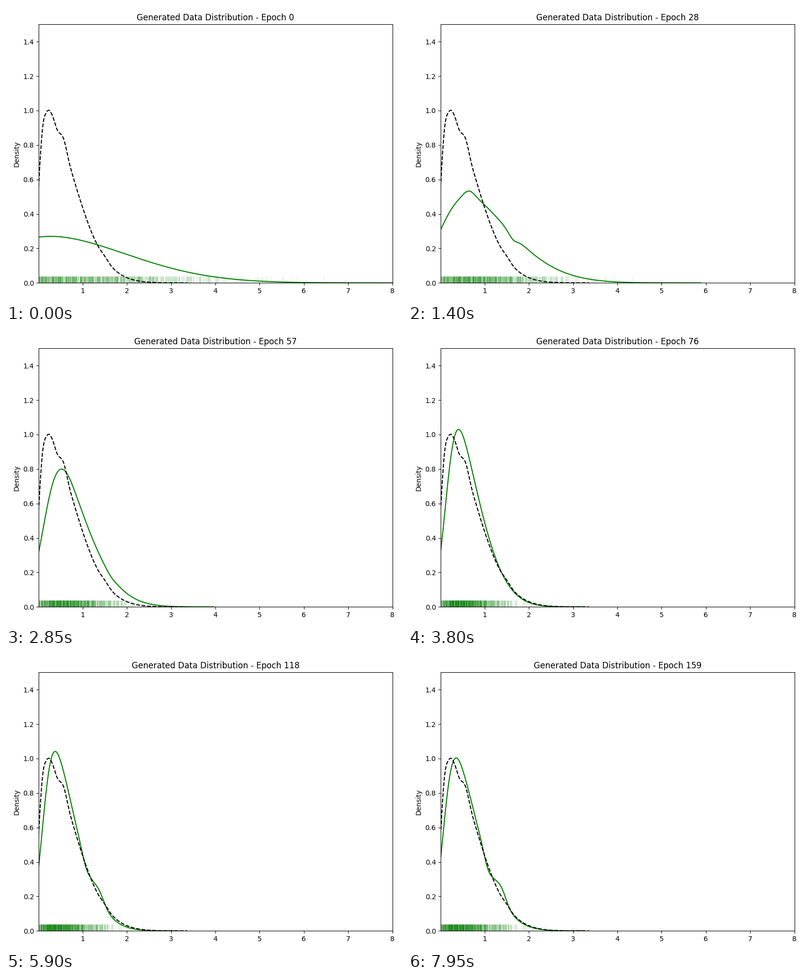
Write a matplotlib script that moves like this. It is 800 px wide and 600 px high and loops after 8 s.

```python
import math

import numpy as np
import matplotlib.pyplot as plt
from matplotlib.animation import FuncAnimation
from matplotlib.collections import LineCollection

FRAMES, INTERVAL = 160, 50
SAMPLES = 1000

# Generated shape over the epochs: bell width, soft left edge and its blur.
EPOCHS = [0, 17, 39, 76, 98, 138, 159]
WIDTH = [2.757, 2.214, 1.466, 1.007, .965, 1.015, 1.02]
EDGE = [-1.3, -.15, .16, .138, .127, .09, .075]
BLUR = [.8, .53, .36, .19, .185, .178, .178]

# Ripples on the smooth shapes: height, centre, width.
REAL_RIPPLES = [(-.022, .17, .06), (-.02, .42, .07),
                (.04, .58, .09), (.012, 1.5, .12)]
EARLY_RIPPLES = [(.05, .65, .17), (-.045, 1.64, .14)]
LATE_RIPPLES = [(-.04, 1.07, .12), (.06, 1.38, .16)]

grid = np.linspace(-5, 10, 1501)
visible = grid >= 0
erf = np.vectorize(math.erf)
quantiles = np.random.default_rng(7).random(SAMPLES)


def half_bell(width, edge, blur):
    """Bell whose left side fades out at a soft edge, with unit area."""
    rise = 1 + erf((grid - edge) / (blur * math.sqrt(2)))
    y = np.exp(-(grid / width) ** 2) * rise
    return y / (y.sum() * (grid[1] - grid[0]))


def ripple(parts):
    return sum(h * np.exp(-((grid - c) / w) ** 2) for h, c, w in parts)


def generated(epoch):
    width, edge, blur = (np.interp(epoch, EPOCHS, track)
                         for track in (WIDTH, EDGE, BLUR))
    early = math.exp(-((epoch - 38) / 14) ** 2)
    late = np.clip((epoch - 90) / 35, 0, 1)
    y = (half_bell(width, edge, blur) + early * ripple(EARLY_RIPPLES)
         + late * ripple(LATE_RIPPLES))
    return np.maximum(y, 0), 3.2 * width


def draw_samples(y):
    cdf = np.cumsum(y[visible])
    return np.interp(quantiles, cdf / cdf[-1], grid[visible])


fig, ax = plt.subplots(figsize=(8, 6), dpi=100)
ax.set_xlim(.01, 8)
ax.set_ylim(0, 1.5)
ax.set_ylabel("Density")
title = ax.set_title("Generated Data Distribution - Epoch 0")
fig.tight_layout()

rug = LineCollection([], colors="green", linewidths=1, alpha=.1,
                     transform=ax.get_xaxis_transform())
ax.add_collection(rug, autolim=False)
fake_line, = ax.plot([], [], color="green", lw=1.5)

real = half_bell(1.06, 0, .09) + ripple(REAL_RIPPLES)
span = (grid >= -.27) & (grid <= 3.36)
ax.plot(grid[span], real[span], "k--", lw=1.5)


def update(epoch):
    y, end = generated(epoch)
    shown = grid <= end
    fake_line.set_data(grid[shown], y[shown])
    rug.set_segments([[(x, 0), (x, .025)] for x in draw_samples(y)])
    title.set_text(f"Generated Data Distribution - Epoch {epoch}")
    return rug, fake_line, title


anim = FuncAnimation(fig, update, frames=FRAMES, interval=INTERVAL,
                     init_func=lambda: update(0), repeat=True,
                     repeat_delay=0)
plt.show()
```
